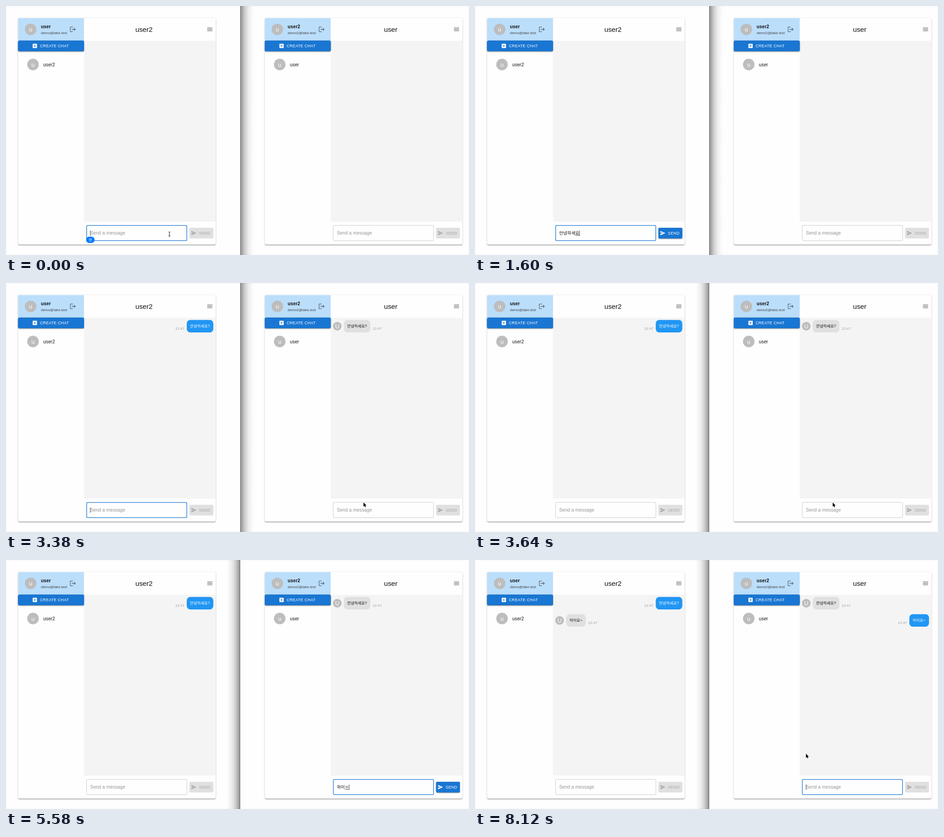
Animation, 1020 px wide and 549 px high, one loop 8.48 s. Source, as an HTML page with a canvas:

```html
<!DOCTYPE html>
<html lang="en">
<head>
<meta charset="utf-8">
<title>Chat between two windows</title>
<style>
  html, body { margin: 0; width: 100%; height: 100%; overflow: hidden; background: #fefefe; }
  canvas { display: block; width: 100%; height: 100%; }
</style>
</head>
<body>
<canvas id="stage" width="1020" height="549"></canvas>
<script>
const ctx = document.getElementById('stage').getContext('2d');
const LOOP = 8480;
const FAMILY = '"Liberation Sans", "Noto Sans CJK KR", "Noto Sans CJK JP", "Noto Sans CJK", sans-serif';
const BLUE = '#1976d2', ICON = 'rgba(0,0,0,.54)', FAINT = 'rgba(0,0,0,.26)';
const PANEL_GAP = 543.5;

const icons = {
  logout: new Path2D('M17 7l-1.41 1.41L18.17 11H8v2h10.17l-2.58 2.58L17 17l5-5zM4 5h8V3H4c-1.1 0-2 .9-2 2v14c0 1.1.9 2 2 2h8v-2H4V5z'),
  menu: new Path2D('M3 18h18v-2H3v2zm0-5h18v-2H3v2zm0-7v2h18V6H3z'),
  add: new Path2D('M19 3H5c-1.11 0-2 .9-2 2v14c0 1.1.89 2 2 2h14c1.1 0 2-.9 2-2V5c0-1.1-.9-2-2-2zm-2 10h-4v4h-2v-4H7v-2h4V7h2v4h4v2z'),
  send: new Path2D('M2.01 21L23 12 2.01 3 2 10l15 2-15 2z'),
  arrow: new Path2D('M0 0V9.2L2.1 7.3L3.6 10.6L5.2 9.9L3.8 6.7H6.6Z')
};

// Keystrokes: time, finished text, syllable still being composed
const users = [
  {
    dx: 0, name: 'user', mail: 'demo@lake.test', peer: 'user2', logoutX: 139.7,
    typeAt: 280, sentAt: 2280,
    keys: [
      [280, '', 'ㅇ'], [400, '', '아'], [620, '', '안'], [800, '안', 'ㄴ'], [900, '안', '녀'],
      [1080, '안', '녕'], [1180, '안녕', 'ㅎ'], [1280, '안녕', '하'], [1400, '안녕하', 'ㅅ'],
      [1540, '안녕하', '세'], [1600, '안녕하세', '요'], [2020, '안녕하세요?', '']
    ],
    focus: t => t < 3600,
    caret: t => t < 60 || (t >= 280 && t < 2520) || (t >= 3020 && t < 3520)
  },
  {
    dx: PANEL_GAP, name: 'user2', mail: 'demo2@lake.test', peer: 'user', logoutX: 144.3,
    typeAt: 4980, sentAt: 6447,
    keys: [
      [4980, '', 'ㅎ'], [5120, '', '하'], [5300, '하', 'ㅇ'], [5440, '하', '이'],
      [5580, '하이', 'ㅇ'], [6100, '하이', '요'], [6120, '하이요~', '']
    ],
    focus: t => t >= 3880,
    caret: t => (t >= 4080 && t < 4600) || (t >= 4980 && t < 6640) ||
                (t >= 7120 && t < 7640) || t >= 8120
  }
];
const messages = [
  { from: 0, text: '안녕하세요?', y: 81.5, w: 58.5 },
  { from: 1, text: '하이요~', y: 119.5, w: 43.3 }
];

const clamp = v => Math.min(1, Math.max(0, v));
const mix = (a, b, p) => a + (b - a) * p;

// cubic-bezier(.4, 0, .2, 1)
function ease(x) {
  if (x <= 0 || x >= 1) return clamp(x);
  let lo = 0, hi = 1, s;
  for (let i = 0; i < 20; i++) {
    s = (lo + hi) / 2;
    const bx = 1.2 * (1 - s) ** 2 * s + 0.6 * (1 - s) * s * s + s ** 3;
    if (bx < x) lo = s; else hi = s;
  }
  return 3 * (1 - s) * s * s + s ** 3;
}

function box(x, y, w, h, r, fill) {
  ctx.beginPath();
  ctx.roundRect(x, y, w, h, r);
  ctx.fillStyle = fill;
  ctx.fill();
}

function shadowBox(x, y, w, h, r, fill, strength = 1) {
  const layers = [[1.9, 1.3, 0.2], [1.3, 1.9, 0.14], [0.6, 4, 0.12]];
  ctx.save();
  for (const [dy, blur, a] of layers) {
    ctx.shadowColor = `rgba(0,0,0,${a * strength})`;
    ctx.shadowOffsetY = dy;
    ctx.shadowBlur = blur;
    box(x, y, w, h, r, fill);
  }
  ctx.restore();
}

function text(str, x, y, size, color, { weight = 400, space = 0, align = 'left' } = {}) {
  ctx.font = `${weight} ${size}px ${FAMILY}`;
  ctx.letterSpacing = space + 'px';
  ctx.textAlign = align;
  ctx.fillStyle = color;
  ctx.fillText(str, x, y);
  return ctx.measureText(str).width;
}

function icon(name, x, y, size, color) {
  ctx.save();
  ctx.translate(x, y);
  ctx.scale(size / 24, size / 24);
  ctx.fillStyle = color;
  ctx.fill(icons[name]);
  ctx.restore();
}

function avatar(letter, x, y, r) {
  ctx.beginPath();
  ctx.arc(x, y, r, 0, 7);
  ctx.fillStyle = '#bdbdbd';
  ctx.fill();
  text(letter, x, y + 4.5, 12.66, '#fff', { align: 'center' });
}

function drawMessage(msg, mine) {
  const { y, w } = msg;
  const x = mine ? 456.7 - w : 200.8;
  if (!mine) avatar('U', 186.3, y + 13.8, 9.5);
  box(x, y, w, 27.4, 7.6, mine ? '#2196f3' : '#e0e0e0');
  text(msg.text, x + 7.4, y + 16.9, 8.35, mine ? '#fff' : '#111', { weight: 500, space: 0.09 });
  text('12:47', mine ? x - 25.2 : x + w + 5, y + 21.2, 7.6, '#999', { space: 0.25 });
}

function drawInput(u, t) {
  const focus = u.focus(t);
  const inset = focus ? 0.65 : 0.45;
  ctx.beginPath();
  ctx.roundRect(177 + inset, 483.2 + inset, 222 - 2 * inset, 34.8 - 2 * inset, 2.4);
  ctx.lineWidth = focus ? 1.3 : 0.8;
  ctx.strokeStyle = focus ? BLUE : 'rgba(0,0,0,.26)';
  ctx.stroke();

  const x = 185.4;
  let end = x;
  const key = t < u.sentAt && u.keys.filter(k => k[0] <= t).pop();
  if (key) {
    const style = { space: 0.1 };
    end += text(key[1], x, 503.9, 9.6, '#111', style);
    const w = text(key[2], end, 503.9, 9.6, '#111', style);
    ctx.fillRect(end, 505.5, w, 0.8);
    end += w;
  } else {
    text('Send a message', x, 504.1, 10.13, 'rgba(0,0,0,.42)', { space: 0.095 });
  }
  if (u.caret(t)) {
    ctx.fillStyle = '#222';
    ctx.fillRect(end, 495, 0.8, 11.8);
  }
}

function drawSend(u, t) {
  const on = t >= u.typeAt && t < u.sentAt;
  const p = t < u.sentAt ? ease((t - u.typeAt) / 250) : 1 - ease((t - u.sentAt) / 250);
  const gray = [224, 224, 224], blue = [25, 118, 210];
  const fill = `rgb(${gray.map((g, i) => Math.round(mix(g, blue[i], p)))})`;
  shadowBox(404.2, 489, 52.3, 23.2, 2.5, fill, p);
  const color = on ? '#fff' : FAINT;
  icon('send', 407.3, 494.3, 12.66, color);
  text('SEND', 425, 503.8, 8.87, color, { space: 0.253 });
}

function drawPanel(u, index, t) {
  ctx.save();
  ctx.translate(u.dx, 0);
  shadowBox(26.7, 26.4, 435.2, 499.4, 3.2, '#fefefe');

  ctx.save();
  ctx.beginPath();
  ctx.roundRect(26.7, 26.4, 435.2, 499.4, 3.2);
  ctx.clip();
  ctx.fillStyle = '#bbdefb';
  ctx.fillRect(26.7, 26.4, 145.1, 50.4);
  ctx.fillStyle = '#f4f4f4';
  ctx.fillRect(171.8, 76.6, 291, 398.8);
  ctx.restore();

  avatar('u', 54.3, 51.6, 12.7);
  text(u.name, 77, 48.6, 10.13, '#111', { weight: 700, space: 0.095 });
  text(u.mail, 77, 61.6, 7.94, '#444');
  icon('logout', u.logoutX, 43.9, 15.2, ICON);
  text(u.peer, 304, 56.9, 15.2, '#111', { align: 'center' });
  icon('menu', 441.4, 43.9, 15.2, ICON);

  shadowBox(26.7, 76.6, 145.1, 22.9, 2.5, BLUE);
  icon('add', 57.2, 81.7, 12.66, '#fff');
  text('CREATE CHAT', 74.7, 91.1, 8.87, '#fff', { space: 0.253 });

  avatar('u', 59.5, 129, 12.7);
  text(u.peer, 82, 132.6, 10.13, '#111', { space: 0.095 });

  for (const msg of messages)
    if (t >= users[msg.from].sentAt) drawMessage(msg, msg.from === index);

  drawInput(u, t);
  drawSend(u, t);
  ctx.restore();
}

// Shadow cast by the front window onto the one behind it
function windowShadow(edge, dir, alpha) {
  if (!alpha) return;
  const reach = 31;
  const g = ctx.createLinearGradient(edge, 0, edge + dir * reach, 0);
  const stops = [[0, 0.42], [0.12, 0.32], [0.3, 0.19], [0.55, 0.075], [0.8, 0.018], [1, 0]];
  for (const [at, a] of stops) g.addColorStop(at, `rgba(0,0,0,${a})`);
  ctx.save();
  ctx.globalAlpha = alpha;
  ctx.fillStyle = g;
  ctx.fillRect(dir > 0 ? edge : edge - reach, 0, reach, 549);
  ctx.fillStyle = '#666';
  ctx.fillRect(dir > 0 ? edge - 1 : edge, 0, 1, 549);
  ctx.restore();
}

function drawBadge(t) {
  const p = 1 - clamp((t - 280) / 100);
  if (!p) return;
  ctx.save();
  ctx.globalAlpha = p;
  box(176.4, 508.6, 18.8, 13.8, 6.9, '#0a7aff');
  text('한', 185.8, 518.4, 7.4, '#fff', { weight: 500, align: 'center' });
  ctx.restore();
}

function pointer(t) {
  if (t < 280) return { x: 360, y: 503, beam: true };
  if (t < 2700) return null;
  if (t < 3800) {
    const u = 1 - (1 - clamp((t - 2700) / 840)) ** 4;
    const x = mix(360, 788, u);
    return { x, y: 503 - 19 * u - 190 * u ** 4 * (1 - u), beam: x < 399 };
  }
  if (t < 4960) {
    const p = ease((t - 3800) / 280);
    return { x: mix(788, 789, p), y: mix(488, 501, p), beam: true };
  }
  if (t < 7120) return null;
  const p = ease((t - 7120) / 120);
  const y = mix(501, 427, p);
  return { x: mix(789, 729, p), y, beam: y > 483 };
}

function drawPointer(t) {
  const c = pointer(t);
  if (!c) return;
  ctx.save();
  ctx.translate(c.x, c.y);
  ctx.lineJoin = 'round';
  if (c.beam) {
    ctx.beginPath();
    for (const s of [-1, 1]) {
      ctx.moveTo(-2.2, 5 * s);
      ctx.quadraticCurveTo(0, 5 * s, 0, 3.4 * s);
      ctx.quadraticCurveTo(0, 5 * s, 2.2, 5 * s);
    }
    ctx.moveTo(0, -4);
    ctx.lineTo(0, 4);
    ctx.moveTo(-1.2, 1.8);
    ctx.lineTo(1.2, 1.8);
    ctx.strokeStyle = '#222';
    ctx.lineWidth = 0.95;
    ctx.stroke();
  } else {
    ctx.strokeStyle = '#fff';
    ctx.lineWidth = 1.4;
    ctx.stroke(icons.arrow);
    ctx.fillStyle = '#000';
    ctx.fill(icons.arrow);
  }
  ctx.restore();
}

function draw(t) {
  ctx.fillStyle = '#fefefe';
  ctx.fillRect(0, 0, 1020, 549);
  ctx.strokeStyle = '#f6f6f6';
  ctx.lineWidth = 1;
  ctx.strokeRect(0.5, 0.5, 1019, 548);
  const front = clamp((t - 3570) / 60);
  windowShadow(517, 1, 1 - front);
  windowShadow(515, -1, front);
  users.forEach((u, i) => drawPanel(u, i, t));
  drawBadge(t);
  drawPointer(t);
}

const start = performance.now();
function tick() {
  draw((performance.now() - start) % LOOP);
  requestAnimationFrame(tick);
}
tick();
</script>
</body>
</html>
```
